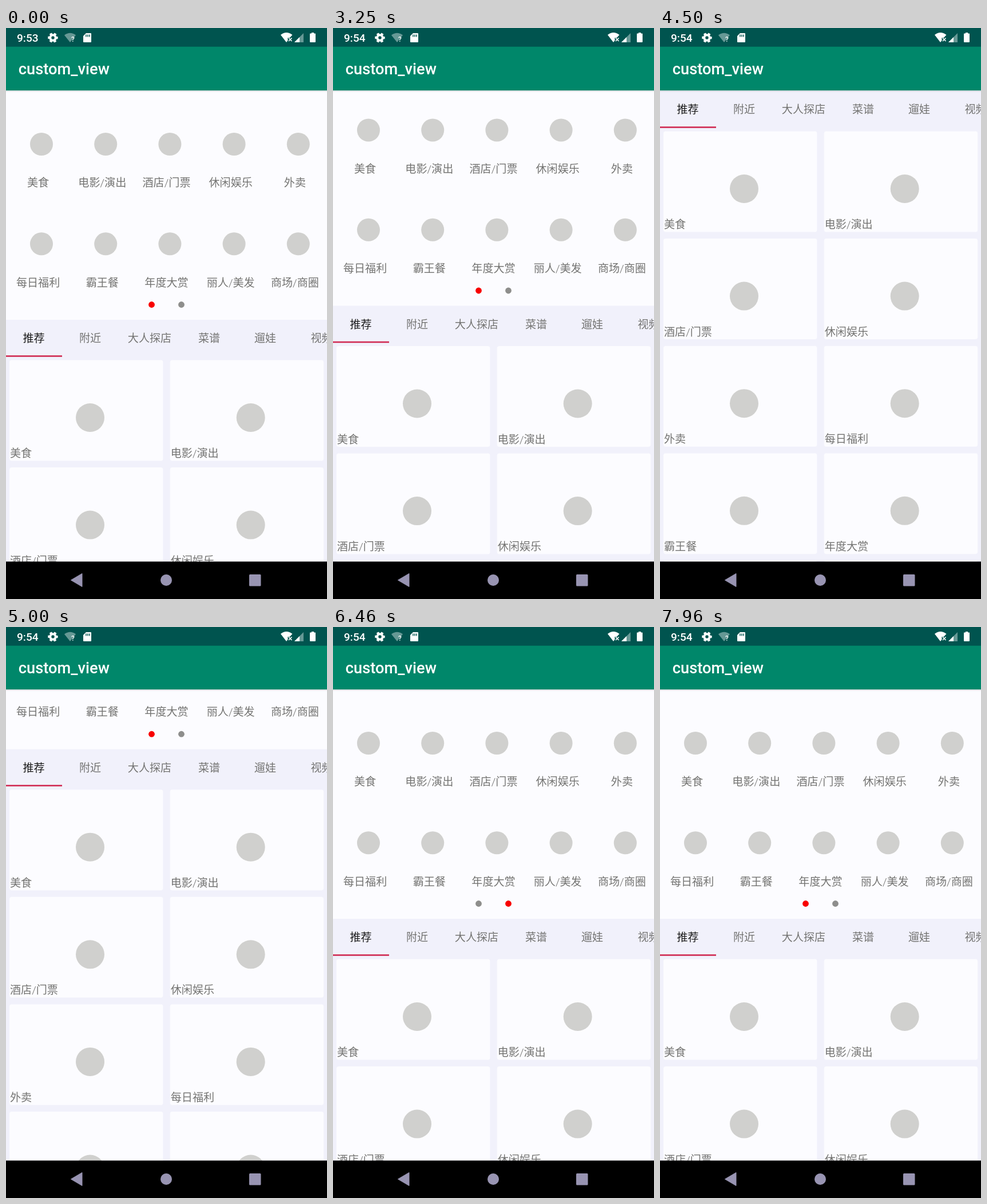
Write an HTML page that moves like this. It is 561 by 998 pixels and loops after 8 s.

```html
<!DOCTYPE html>
<html lang="zh-CN">
<head>
<meta charset="utf-8">
<title>custom_view</title>
<style>
  html, body { margin: 0; width: 100%; height: 100%; overflow: hidden; background: #000; }
  svg { display: block; width: 100vw; height: 100vh; }
  text { font-family: Roboto, "Noto Sans CJK SC", "Noto Sans CJK", sans-serif; font-size: 19.1px; }
  .label { font-weight: 350; fill: #737371; }
  .mid { text-anchor: middle; }
  .icon { fill: #6e6e62; fill-opacity: .31; }
  .bar { font-weight: 500; fill: #fff; }
</style>
</head>
<body>
<svg viewBox="0 0 561 998">
  <defs>
    <linearGradient id="shade" x1="0" y1="0" x2="0" y2="1">
      <stop offset="0" stop-color="#000" stop-opacity=".16"/>
      <stop offset="1" stop-color="#000" stop-opacity="0"/>
    </linearGradient>
  </defs>
  <rect width="561" height="998" fill="#f1f1fb"/>

  <g id="content">
    <rect y="109" width="561" height="401" fill="#fcfcff"/>
    <g id="pager"></g>
    <circle class="dot" cx="254.5" cy="483.5" r="5.4"/>
    <circle class="dot" cx="306.5" cy="483.5" r="5.4"/>
    <g id="tabs"></g>
    <rect y="572.2" width="98" height="2.6" fill="#d02a52"/>
    <g id="cards"></g>
  </g>

  <rect y="109" width="561" height="3" fill="url(#shade)"/>
  <rect width="561" height="33" fill="#00544f"/>
  <rect y="32.7" width="561" height="76.4" fill="#00876a"/>
  <text class="bar" x="21.8" y="80.8" style="font-size:27.27px">custom_view</text>

  <text class="bar" id="clock" x="19" y="24" style="font-size:19.1px"></text>
  <g fill="#fff">
    <g fill="none" stroke="#fff">
      <circle cx="82" cy="17" r="4.7" stroke-width="4"/>
      <circle cx="82" cy="17" r="7.2" stroke-width="3" stroke-dasharray="4.3 3.24" stroke-dashoffset="2.15"/>
    </g>
    <path d="M102 12.5Q112 5 122 12.5L112 25Z" opacity=".4"/>
    <text class="bar" x="114" y="24" style="font-size:12px">?</text>
    <path d="M140 9H148Q149 9 149 10V24Q149 25 148 25H136Q135 25 135 24V14Z"/>
    <path d="M140 11.5v4M143 11.5v4M146 11.5v4" stroke="#00544f" stroke-width="1.5"/>
    <path d="M480 12Q490 4 500.5 12L496 17H492.5V22L490 25Z"/>
    <path d="M494 17.5l5.5 5.5M499.5 17.5l-5.5 5.5" stroke="#fff" stroke-width="1.7"/>
    <path d="M520 9V25H504Z" opacity=".4"/>
    <path d="M513 16V25H504Z"/>
    <path d="M534 8H538V9.5H540Q541 9.5 541 10.5V24Q541 25 540 25H532Q531 25 531 24V10.5Q531 9.500 532 9.5H534Z"/>
  </g>

  <rect y="932.55" width="561" height="66"/>
  <g fill="#9894b2">
    <path d="M113.5 965L133 953.5V976.5Z" stroke="#9894b2" stroke-linejoin="round"/>
    <circle cx="280" cy="965" r="10"/>
    <rect x="425" y="955" width="20.5" height="20.5" rx="1.5"/>
  </g>
</svg>
<script>
const LOOP = 8000, STEP = 1000 / 24;
const WIDTH = 561, CELL = WIDTH / 5, ROW = 174.3, PITCH = 187.6;
const items = ['美食', '电影/演出', '酒店/门票', '休闲娱乐', '外卖',
  '每日福利', '霸王餐', '年度大赏', '丽人/美发', '商场/商圈'];
const tabs = [['推荐', 48.5], ['附近', 147], ['大人探店', 251], ['菜谱', 355], ['遛娃', 453], ['视频', 551.5]];

const $ = id => document.getElementById(id);

function add(parent, tag, attrs, text) {
  const el = document.createElementNS('http://www.w3.org/2000/svg', tag);
  for (const key in attrs) el.setAttribute(key, attrs[key]);
  if (text) el.textContent = text;
  return parent.appendChild(el);
}

// Grid pages; each cell keeps its press highlight.
const presses = [];
for (let page = 0; page < 2; page++) {
  items.forEach((name, i) => {
    const x = page * WIDTH + (i % 5) * CELL, y = Math.floor(i / 5) * ROW;
    presses.push(add($('pager'), 'rect', {
      x, y: 109 + y, width: CELL, height: ROW, rx: 2, fill: '#d5d5db', opacity: 0
    }));
    add($('pager'), 'circle', { class: 'icon', cx: x + 62, cy: 203 + y, r: 20 });
    add($('pager'), 'text', { class: 'label mid', x: x + CELL / 2, y: 277.2 + y }, name);
  });
}

tabs.forEach(([name, x], i) => {
  const tab = add($('tabs'), 'text', { class: 'label mid', x, y: 549 }, name);
  if (!i) tab.style.fill = '#1c1c1c';
});

items.forEach((name, i) => {
  const x = (i % 2) * 280.7, y = Math.floor(i / 2) * PITCH;
  add($('cards'), 'rect', { x: x + 6, y: 580.5 + y, width: 268.5, height: 176, rx: 4, fill: '#fcfcff' });
  add($('cards'), 'circle', { class: 'icon', cx: x + 147, cy: 681 + y, r: 25 });
  add($('cards'), 'text', { class: 'label', x: x + 7, y: 750 + y }, name);
});

const linear = p => p;
const easeOut = p => 1 - (1 - p) ** 3;
const smooth = p => p * p * (3 - 2 * p);

// Keys are [time, value, easing into this key].
function track(t, keys) {
  for (let i = 1; i < keys.length; i++) {
    const [t0, v0] = keys[i - 1], [t1, v1, ease = linear] = keys[i];
    if (t <= t0) return v0;
    if (t < t1) return v0 + (v1 - v0) * ease((t - t0) / (t1 - t0));
  }
  return keys[keys.length - 1][1];
}

const scrollKeys = [[3170, 0], [3250, 24.5], [3800, 400, smooth], [4800, 400], [5400, 0, smooth]];
const pageKeys = [[5880, 0], [6042, 204.7], [6120, 310], [6450, WIDTH, easeOut],
  [7050, WIDTH], [7208, 433], [7290, 335], [7620, 0, easeOut]];
const press = (t, start) => track(t, [[start, 0], [start + 100, 1], [start + 260, 1], [start + 480, 0]]);

const dots = document.querySelectorAll('.dot');

function render(t) {
  $('content').setAttribute('transform', `translate(0 ${-track(t, scrollKeys)})`);
  $('pager').setAttribute('transform', `translate(${-track(t, pageKeys)} 0)`);
  presses[9].setAttribute('opacity', press(t, 5820));
  presses[15].setAttribute('opacity', press(t, 6990));
  const page = t >= 6130 && t < 7300 ? 1 : 0;
  dots.forEach((dot, i) => dot.setAttribute('fill', i === page ? '#f80000' : '#8e8e8c'));
  $('clock').textContent = t < 2000 ? '9:53' : '9:54';
}

const start = performance.now();
function tick() {
  const t = (performance.now() - start) % LOOP;
  // The screen moves in 24 steps a second; 2 ms absorbs rounding.
  render(Math.floor((t + 2) / STEP) * STEP);
  requestAnimationFrame(tick);
}
tick();
</script>
</body>
</html>
```
